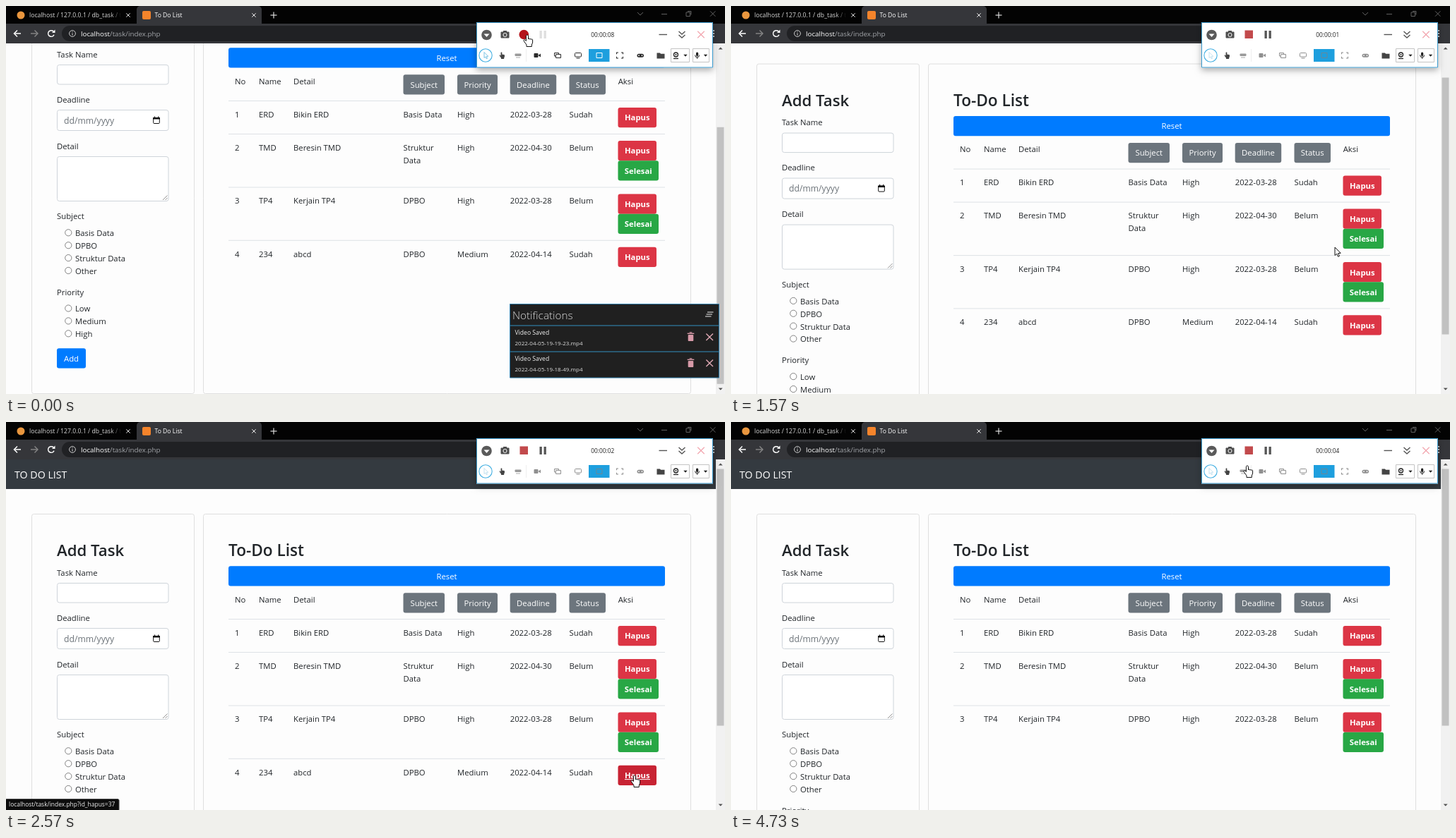
An HTML page with a canvas that plays this animation: 1018 px wide and 550 px high, repeating every 4760 ms.

```html
<!DOCTYPE html>
<html lang="en">
<head>
<meta charset="utf-8">
<title>To Do List</title>
<style>
html, body { margin: 0; width: 100%; height: 100%; overflow: hidden; background: #fdfdfd; }
canvas { display: block; }
</style>
</head>
<body>
<canvas id="stage" width="1018" height="550"></canvas>
<script>
const c = document.getElementById('stage').getContext('2d');
const LOOP = 4760;
const INK = '#212529', RED = '#dc3545', GREEN = '#28a745', BLUE = '#007bff';

// Keyframes: time, then values
const scrollKeys = [[0, 145], [1430, 145], [1590, 44.5], [1700, 44.5], [1860, 0]];
const pointerKeys = [
  [0, 738, 41], [150, 738, 41], [540, 867, 230], [930, 936, 342], [1070, 936, 342],
  [1400, 855, 342], [1690, 855, 342], [2000, 890, 483], [2150, 890, 501],
  [3200, 890, 501], [3690, 850, 560], [4290, 740, 560], [4730, 731, 62]
];

function at(keys, t) {
  const i = keys.findIndex(k => k[0] > t);
  if (i < 0) return keys[keys.length - 1].slice(1);
  const a = keys[i - 1], b = keys[i];
  const p = (t - a[0]) / (b[0] - a[0]), e = p * p * (3 - 2 * p);
  return a.slice(1).map((v, n) => v + (b[n + 1] - v) * e);
}

function box(x, y, w, h, fill, stroke, r = 0) {
  c.beginPath();
  c.roundRect(x, y, w, h, r);
  if (fill) { c.fillStyle = fill; c.fill(); }
  if (stroke) { c.strokeStyle = stroke; c.lineWidth = 1; c.stroke(); }
}

function disc(x, y, r, fill, stroke, width = 1) {
  c.beginPath();
  c.arc(x, y, r, 0, 7);
  if (fill) { c.fillStyle = fill; c.fill(); }
  if (stroke) { c.strokeStyle = stroke; c.lineWidth = width; c.stroke(); }
}

function path(pts, color, width = 1) {
  c.beginPath();
  for (let i = 0; i < pts.length; i += 2) c.lineTo(pts[i], pts[i + 1]);
  c.strokeStyle = color;
  c.lineWidth = width;
  c.stroke();
}

function shape(d, x, y, fill, stroke, scale = 1) {
  const p = new Path2D(d);
  c.save();
  c.translate(x, y);
  c.scale(scale, scale);
  c.lineWidth = 1;
  if (fill) { c.fillStyle = fill; c.fill(p); }
  if (stroke) { c.strokeStyle = stroke; c.stroke(p); }
  c.restore();
}

// y is the middle of the capitals
function text(s, x, y, size = 11.3, color = INK, weight = 400, align = 'left') {
  c.font = `${weight} ${size}px "Open Sans", "Noto Sans", sans-serif`;
  c.textAlign = align;
  c.fillStyle = color;
  c.fillText(s, x, y + size * 0.36);
}

function cross(x, y, r, color, width = 1) {
  path([x - r, y - r, x + r, y + r], color, width);
  path([x - r, y + r, x + r, y - r], color, width);
}

function button(s, x, y, w, color, weight = 400, h = 28.3) {
  box(x, y, w, h, color, null, 3);
  text(s, x + w / 2, y + h / 2 + 0.3, 11.3, '#fff', weight, 'center');
}

function drawForm() {
  box(36.5, 130.5, 230, 564, null, '#dfdfdf', 3);
  text('Add Task', 72, 182, 22.2, INK, 600);
  text('Task Name', 72, 213.5);
  box(72.5, 228.5, 157.5, 27.5, '#fff', '#ced4da', 3);
  text('Deadline', 72, 277.5);
  box(72.5, 292.5, 157.5, 29, '#fff', '#ced4da', 3);
  text('dd/mm/yyyy', 82, 307.5, 12.2, '#6b7278');
  box(208.7, 303.5, 8.6, 8, null, '#111', 1);
  box(208, 303, 10, 2.5, '#111');
  box(210, 301.5, 1.2, 2, '#111');
  box(215, 301.5, 1.2, 2, '#111');
  text('Detail', 72, 343.5);
  box(72.5, 358.5, 157.5, 63, '#fff', '#ced4da', 3);
  path([222, 420, 228.5, 413.5], '#777', 0.8);
  path([225.5, 420, 228.5, 417], '#777', 0.8);
  text('Subject', 72, 443);
  ['Basis Data', 'DPBO', 'Struktur Data', 'Other'].forEach((s, i) => radio(s, 466.3 + i * 17.9));
  text('Priority', 72, 550.5);
  ['Low', 'Medium', 'High'].forEach((s, i) => radio(s, 573.5 + i * 17.9));
  button('Add', 72, 630.3, 41, BLUE);
}

function radio(s, y) {
  disc(88.3, y, 4.6, '#fff', '#767676', 0.9);
  text(s, 98, y + 0.8);
}

const rows = [
  ['1', 'ERD', 'Bikin ERD', 'Basis Data', 'High', '2022-03-28', 'Sudah'],
  ['2', 'TMD', 'Beresin TMD', 'Struktur Data', 'High', '2022-04-30', 'Belum'],
  ['3', 'TP4', 'Kerjain TP4', 'DPBO', 'High', '2022-03-28', 'Belum'],
  ['4', '234', 'abcd', 'DPBO', 'Medium', '2022-04-14', 'Sudah']
];
const columns = [324, 358, 407, 562.5, 639, 713.7, 797.5];
const lines = [279.5, 326.5, 402, 477.3];

function drawTable(count, hover) {
  box(279.5, 130.5, 690, 564, null, '#dfdfdf', 3);
  text('To-Do List', 315, 182, 22.6, INK, 600);
  button('Reset', 315, 204.3, 618, BLUE);
  ['No', 'Name', 'Detail'].forEach((s, i) => text(s, columns[i], 251.5));
  [['Subject', 58.5], ['Priority', 57], ['Deadline', 65.5], ['Status', 51.5]]
    .forEach(([s, w], i) => button(s, columns[i + 3], 242.3, w, '#6c757d'));
  text('Aksi', 866.7, 251.5);
  rows.slice(0, count).forEach((row, i) => {
    const y = lines[i];
    path([315, y, 933, y], '#dee2e6');
    row.forEach((s, n) => {
      const parts = i === 1 && n === 3 ? s.split(' ') : [s];
      parts.forEach((p, k) => text(p, columns[n], y + 19.2 + k * 18));
    });
    const hot = hover && i === 3;
    button('Hapus', 866.5, y + 9.4, 54.5, hot ? '#c82333' : RED, 700);
    if (hot) path([876, y + 29.3, 912, y + 29.3], '#fff');
    if (row[6] === 'Belum') button('Selesai', 866.5, y + 37.7, 57.5, GREEN, 700);
  });
}

function drawPage(t, scroll) {
  box(0, 0, 1018, 550, '#fdfdfd');
  c.save();
  c.translate(0, -scroll);
  box(0, 53, 1005, 42, '#343a40');
  text('TO DO LIST', 12, 74.5, 14.2, '#fff');
  drawForm();
  drawTable(t < 2850 ? 4 : 3, t >= 2130);
  c.restore();
  box(1005, 53, 13, 497, '#f1f1f1');
  box(1006.5, 66.5 + scroll * 0.725, 10, 364, '#c1c1c1');
  shape('M-3 1.5 L0 -1.5 L3 1.5Z', 1011.7, 60, '#505050');
  shape('M-3 -1.5 L0 1.5 L3 -1.5Z', 1011.7, 543, '#505050');
}

function drawBrowser(focused) {
  box(0, 0, 1018, 26, '#030303');
  box(185, 0, 177, 30, '#35363a', null, 5);
  box(0, 25, 1018, 28, '#35363a');
  disc(21, 13, 5.5, '#e9963e');
  text('localhost / 127.0.0.1 / db_task / t', 33, 13, 8.7, '#d8d8d8');
  const fade = c.createLinearGradient(148, 0, 163, 0);
  fade.addColorStop(0, '#03030300');
  fade.addColorStop(1, '#030303');
  box(148, 4, 17, 18, fade);
  cross(173, 13, 2.7, '#ddd');
  box(193, 7, 12, 12, '#f5842b', null, 2);
  text('To Do List', 210.5, 13, 8.6, '#fff');
  cross(351, 13, 2.7, '#eee');
  path([374.5, 13, 383.5, 13], '#ddd', 1.2);
  path([379, 8.5, 379, 17.5], '#ddd', 1.2);

  const frame = focused ? '#fff' : '#606060';
  path([894, 9, 898, 13, 902, 9], frame);
  path([928, 11.5, 936, 11.5], frame);
  box(963, 9, 5.5, 5.5, null, frame);
  path([965, 7.5, 970, 7.5, 970, 12.5], frame);
  cross(1000.7, 11, 3.7, frame);

  path([21, 39, 11.5, 39], '#fff', 1.5);
  path([16, 34.5, 11.5, 39, 16, 43.5], '#fff', 1.5);
  path([35, 39, 45, 39], '#888', 1.4);
  path([40.5, 34.5, 45, 39, 40.5, 43.5], '#888', 1.4);
  c.beginPath();
  c.arc(64, 39, 4.3, 0.4, 5.6);
  c.strokeStyle = '#fff';
  c.lineWidth = 1.5;
  c.stroke();
  shape('M1 -1 L5.5 -1 L5.5 -5.5Z', 64, 39, '#fff');
  box(79, 28, 763, 22, '#202124', null, 11);
  disc(94, 39, 4.4, null, '#ccc');
  path([94, 38.5, 94, 41.5], '#ccc', 1.1);
  path([94, 36.2, 94, 37.3], '#ccc', 1.1);
  text('localhost', 106, 39, 9.8, '#fff');
  const w = c.measureText('localhost').width;
  text('/task/index.php', 106 + w, 39, 9.8, '#a2a5a9');

  path([802, 37, 800, 37, 800, 44, 808, 44, 808, 41], '#bbb');
  path([802.5, 41, 804, 37.5, 809, 37.5], '#bbb');
  path([806.5, 34.5, 809.5, 37.5, 806.5, 40], '#bbb');
  shape('M0 -5 L1.4 -1.6 L5 -1.4 L2.2 1 L3.1 4.5 L0 2.6 L-3.1 4.5 L-2.2 1 L-5 -1.4 L-1.4 -1.6Z', 828.5, 39, null, '#ccc');
  box(854.5, 34, 10, 10, '#25bcc5');
  box(877, 33.5, 11, 11, '#b9bbbd');
  box(900.5, 33.5, 11, 11, '#c9cbcc');
  box(925.5, 36, 8, 8, '#fff', null, 1);
  disc(929.5, 35.3, 1.8, '#fff');
  disc(934, 40, 1.8, '#fff');
  box(949.5, 35, 9, 8, null, '#fff');
  box(954.5, 35, 4, 8, '#fff');
  disc(978, 39, 8, '#5b93d4');
  disc(978, 36.7, 3, '#1d2a44');
  shape('M-5.5 6 Q-5 0.8 0 0.8 Q5 0.8 5.5 6 Q0 10 -5.5 6Z', 978, 39, '#1d2a44');
  [35, 39, 43].forEach(y => disc(1002, y, 1.1, '#eee'));
}

const ARROW = 'M0 0 L0 11.5 L2.7 9.2 L4.6 13.3 L6.5 12.4 L4.6 8.5 L8.2 8.3Z';
const HAND = 'M0 0 C-1.5 0 -1.6 1 -1.6 2 L-1.6 8.5 L-3.3 7 C-4.7 6.3 -5.6 7.7 -4.7 8.8 L-1 14 L-1 16.5 L6.3 16.5 L6.3 14 L7.6 11 L7.6 7 C7.6 5.7 5.6 5.5 5.4 6.6 C5.2 5 3.5 5 3.4 6.2 C3.2 4.8 1.6 4.8 1.5 6 L1.5 2 C1.5 1 1.4 0 0 0Z';

function drawRecorder(recording, clock) {
  c.save();
  c.shadowColor = 'rgba(0,0,0,.32)';
  c.shadowBlur = 9;
  c.shadowOffsetY = 3;
  box(666, 23, 335, 64.5, '#fff');
  c.restore();
  box(666.5, 23.5, 334, 63.5, '#fff', '#3a9bd0');

  disc(680.5, 41, 7.3, '#5a5a5a');
  shape('M-4 -1.5 L4 -1.5 L0 3Z', 680.5, 41, '#fff');
  box(700.5, 36.5, 12, 9, '#4d4d4d', null, 1);
  box(704, 35, 5, 3, '#4d4d4d');
  disc(706.5, 41, 2.6, '#4d4d4d', '#fff');
  if (recording) box(727.5, 34.5, 11.5, 11.5, '#c24a4c');
  else disc(733.3, 40.5, 6.8, '#b5141c');
  const pause = recording ? '#555' : '#dedede';
  box(755.5, 35, 3.3, 11, pause);
  box(761.5, 35, 3.3, 11, pause);
  text('00:00:0' + clock, 828.3, 41, 8.3, '#222');
  path([924.5, 40.5, 936, 40.5], '#555', 1.4);
  [36, 41].forEach(y => path([952.5, y, 957, y + 4, 961.5, y], '#555', 1.4));
  cross(984, 40.5, 4.8, '#f3a9b1', 1.3);

  const tool = recording ? '#909090' : '#2b2b2b';
  disc(679, 70, 9.2, '#fff', '#45b0e2', 1.1);
  shape(ARROW, 677, 65.5, '#fff', recording ? '#a9d6ea' : '#45a9d8', 0.7);
  shape(HAND, 701.5, 65.5, '#444', null, 0.58);
  box(720.5, 67.5, 9, 3.5, '#999', null, 1);
  path([722, 73, 728, 73], '#aaa');
  path([736.5, 61, 736.5, 79], '#eee');
  box(747.5, 67, 6, 6, tool, null, 1);
  shape('M-1.5 0 L2 -2.5 L2 2.5Z', 755, 70, tool);
  box(776.5, 66.5, 6, 4.5, null, tool);
  box(778.5, 68.5, 7, 5, '#fff', tool);
  box(805.5, 66.5, 9, 5.5, null, tool, 1);
  path([807.5, 74, 812.5, 74], tool);
  box(825, 61, 29.5, 18, '#1e9fde');
  box(836, 66.5, 8, 7, null, recording ? '#6b8796' : '#fff');
  for (const sx of [-1, 1]) for (const sy of [-1, 1])
    path([869 + sx * 4.5, 70 + sy * 1.8, 869 + sx * 4.5, 70 + sy * 4, 869 + sx * 2, 70 + sy * 4], tool, 1.1);
  box(893.5, 67.7, 9.5, 5, tool, null, 2.5);
  disc(896, 70.2, 0.9, '#fff');
  disc(900.5, 70.2, 0.9, '#fff');
  shape('M-5.5 -4 L-1 -4 L0 -2.7 L5.5 -2.7 L5.5 4 L-5.5 4Z', 927, 70.5, '#444');
  box(941.5, 60.5, 26, 19, '#fff', '#c4c4c4');
  disc(948.5, 69, 3, null, '#222', 1.3);
  disc(948.5, 69, 1.1, '#222');
  path([945, 74.5, 952, 74.5], '#222', 1.3);
  box(972.5, 60.5, 23, 19, '#fff', '#c4c4c4');
  box(977, 65.5, 3.2, 5.5, '#222', null, 1.6);
  path([975.5, 69.5, 976.5, 72.2, 980.7, 72.2, 981.7, 69.5], '#222');
  path([978.6, 72, 978.6, 75], '#222');
  [962, 990.5].forEach(x => shape('M-2.7 -1.3 L2.7 -1.3 L0 1.7Z', x, 70, '#222'));
}

function drawNotices(alpha) {
  c.save();
  c.globalAlpha = alpha;
  box(713.5, 422.5, 296, 104.5, '#202020', '#2f7ca8');
  text('Notifications', 717, 438.5, 15.3, '#dcdcdc', 300);
  [[993, 434], [991.5, 437], [990, 440]].forEach(([x, y]) => path([x, y, x + 8.5, y], '#ddd', 1.1));
  ['19-23', '18-49'].forEach((stamp, i) => {
    const y = 453 + i * 37;
    path([713, y, 1009, y], '#338fc0', 1.2);
    text('Video Saved', 720.5, y + 10.3, 8.6, '#eee');
    text(`2022-04-05-19-${stamp}.mp4`, 720.5, y + 24.7, 8, '#ddd');
    box(965.7, y + 13, 7.6, 9, '#d79aa8', null, 1);
    path([964.7, y + 11.3, 974.3, y + 11.3], '#d79aa8', 1.4);
    path([967.7, y + 9.8, 971.3, y + 9.8], '#d79aa8', 1.2);
    cross(996.2, y + 16.2, 4.8, '#e0a9b5', 1.4);
  });
  c.restore();
}

function draw(t) {
  const [scroll] = at(scrollKeys, t);
  const [x, y] = at(pointerKeys, t);
  const panel = t < 3730 || t >= 4000;
  const recording = t >= 150;
  drawPage(t, scroll);
  drawBrowser(!panel);
  if (t >= 2250 && t < 2850) {
    box(-1, 534.5, 161, 17, '#0c0c0c', '#444', 2);
    text('localhost/task/index.php?id_hapus=37', 4, 542.3, 8.45, '#eee');
  }
  if (panel) drawRecorder(recording, recording ? Math.max(0, Math.floor((t - 500) / 1000)) : 8);
  if (t < 400) drawNotices(Math.min(1, (400 - t) / 150));
  const hand = panel && y < 87 || t >= 2130 && t < 2850;
  if (hand) shape(HAND, x, y, '#fff', '#111');
  else shape(ARROW, x, y, '#fff', '#111');
}

const start = performance.now();
function tick() {
  draw((performance.now() - start) % LOOP);
  requestAnimationFrame(tick);
}
tick();
</script>
</body>
</html>
```
